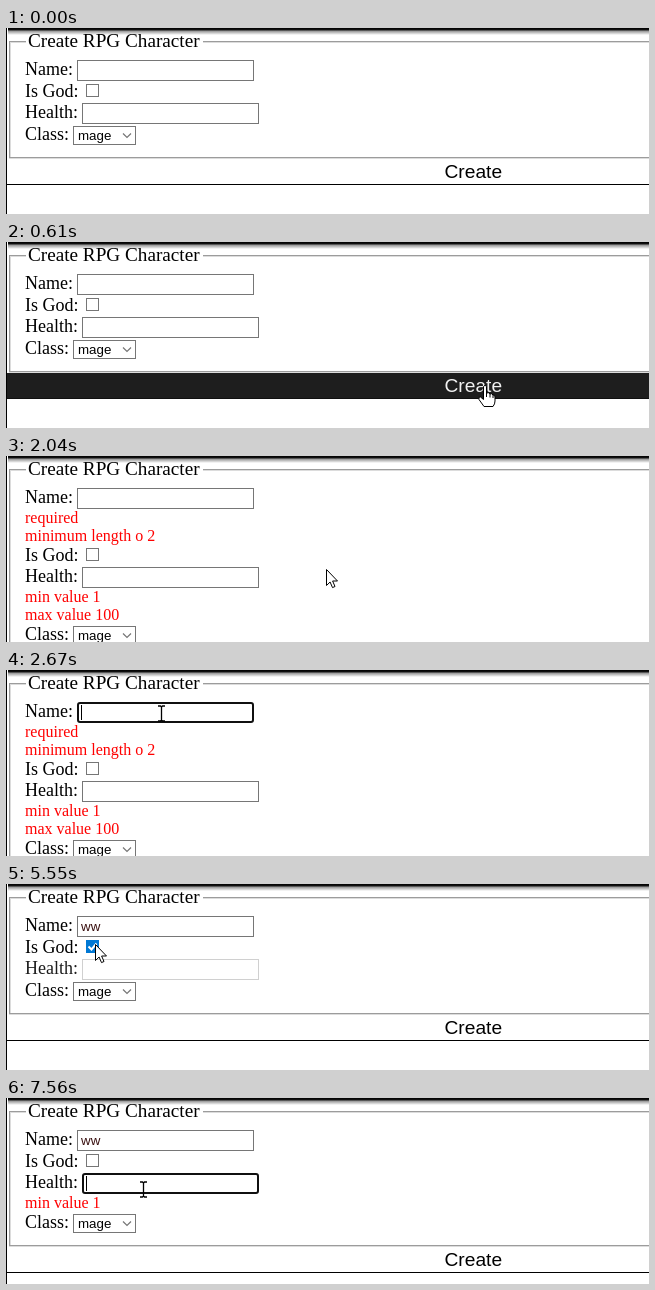
These frames come from a looping animation (643x186 px, 8 s). An HTML page with a canvas:

```html
<!DOCTYPE html>
<html lang="en">
<head>
<meta charset="utf-8">
<title>Create RPG Character</title>
<style>
html, body { margin: 0; width: 100%; height: 100%; overflow: hidden; background: #fff; }
canvas { display: block; }
</style>
</head>
<body>
<canvas id="stage" width="643" height="186"></canvas>
<script>
const W = 643, H = 186, LOOP = 8000, LINE = 18;
const ctx = document.getElementById('stage').getContext('2d', { alpha: false });
const SERIF = '"Liberation Serif", "Times New Roman", serif';
const SANS = '"Liberation Sans", Arial, sans-serif';
const BORDER = '#767676';

// Pointer path: time, x, y
const path = [
  [260, 560, 190], [400, 514, 157], [610, 479, 143], [780, 415, 137], [960, 383, 136],
  [1790, 383, 136], [2050, 318, 112], [2350, 190, 56], [2550, 155, 43],
  [4690, 155, 43], [4800, 89, 60],
  [6700, 89, 60], [7120, 128, 113],
  [7230, 128, 113], [7450, 137, 91]
];
const presses = [[1360, 1630], [2590, 2670], [5340, 5480], [6450, 6520], [7490, 7560]];

const shapes = {
  arrow: new Path2D('M.5 .5V16.5L4.1 13 6.5 18.6 9 17.5 6.6 12H11.5Z'),
  hand: new Path2D('M-1.5 1.5Q0-1 1.5 1.5V8q2.5-1 3.5 1q2-1 3 1q2-.5 2 2V16q0 3-2 5.5H-1L-6 14.5Q-7 11.5-4.5 12L-1.5 14.5Z'),
  text: new Path2D('M-3.5-7.5h2.5l1 1 1-1h2.5M0-6.5v13M-3.5 7.5h2.5l1-1 1 1h2.5')
};

const within = (t, from, to) => t >= from && t < to;
const clamp = v => Math.max(0, Math.min(1, v));
const ease = p => 1 - Math.pow(1 - clamp(p), 2.4);
const grey = v => `rgb(${[v, v, v].map(Math.round)})`;

function fill(x, y, w, h, color) {
  ctx.fillStyle = color;
  ctx.fillRect(x, y, w, h);
}

function frame(x, y, w, h, color) {
  ctx.strokeStyle = color;
  ctx.lineWidth = 1;
  ctx.strokeRect(x + .5, y + .5, w - 1, h - 1);
}

function write(text, x, y, size = 18, color = '#000', family = SERIF) {
  ctx.font = `${size}px ${family}`;
  ctx.fillStyle = color;
  ctx.fillText(text, x, y);
}

function pointerAt(t) {
  if (t < path[0][0]) return null;
  const i = path.findIndex(p => p[0] > t);
  if (i < 0) return path[path.length - 1].slice(1);
  const [t0, x0, y0] = path[i - 1], [t1, x1, y1] = path[i];
  const k = (t - t0) / (t1 - t0);
  return [x0 + (x1 - x0) * k, y0 + (y1 - y0) * k];
}

function input(x, y, { value = '', focused, caret, disabled }) {
  if (focused) {
    ctx.strokeStyle = '#101010';
    ctx.lineWidth = 2;
    ctx.beginPath();
    ctx.roundRect(x + 1, y + 1, 175, 19, 2);
    ctx.stroke();
  } else {
    frame(x, y, 177, 21, disabled ? '#d0d0d0' : BORDER);
  }
  write(value, x + 4, y + 15, 13.333, '#3a1010', SANS);
  if (caret) fill(x + 4 + Math.round(ctx.measureText(value).width), y + 3, 1, 15, '#000');
}

function errors(list, y) {
  list.forEach((text, i) => write(text, 19, y + 20 + i * LINE, 16, '#f00'));
}

function checkbox(x, y, checked, hover) {
  if (checked) {
    fill(x, y, 13, 13, '#0078d4');
    ctx.strokeStyle = '#fff';
    ctx.lineWidth = 2;
    ctx.stroke(new Path2D(`M${x + 2.5} ${y + 6.5}l3 3 5-6`));
  } else {
    frame(x, y, 13, 13, hover ? '#1a86d9' : BORDER);
  }
}

function fieldset(bottom) {
  const dark = '#9c9c9c', light = '#dcdcdc';
  fill(3, 13, W, 1, dark);
  fill(4, 14, W, 1, light);
  fill(3, 13, 1, bottom - 12, dark);
  fill(4, 14, 1, bottom - 14, light);
  fill(4, bottom, W, 1, dark);
  fill(3, bottom + 1, W, 1, light);
  fill(20, 12, 177, 4, '#fff');
  write('Create RPG Character', 22, 19, 19.2);
}

function pageEdges() {
  const shade = ctx.createLinearGradient(0, 0, 0, 7);
  shade.addColorStop(0, '#000');
  shade.addColorStop(.25, '#111');
  shade.addColorStop(.45, 'rgba(0,0,0,.4)');
  shade.addColorStop(1, 'rgba(0,0,0,0)');
  fill(2, 0, W, 7, shade);
  fill(0, 0, 1, H, '#000');
}

function drawPointer(t, [x, y], kind) {
  if (presses.some(([from, to]) => within(t, from, to))) {
    ctx.fillStyle = 'rgba(205,190,0,.75)';
    ctx.beginPath();
    ctx.arc(x - 1, y - 1, 12, 0, 7);
    ctx.fill();
  }
  ctx.save();
  ctx.translate(Math.round(x), Math.round(y));
  if (kind === 'text') ctx.translate(.5, .5);
  else {
    ctx.fillStyle = '#fff';
    ctx.fill(shapes[kind]);
  }
  ctx.strokeStyle = '#000';
  ctx.lineWidth = kind === 'text' ? 1.3 : 1;
  ctx.stroke(shapes[kind]);
  if (kind === 'hand') ctx.stroke(new Path2D('M1.5 8v4M5 9v3.5M8 10v3'));
  ctx.restore();
}

function draw(t) {
  const isGod = within(t, 5480, 6520);
  const nameErrors = within(t, 1630, 4330)
    ? ['required', 'minimum length o 2'].slice(t < 3870 ? 0 : 1) : [];
  const healthErrors = within(t, 1630, 5480) ? ['min value 1', 'max value 100']
    : t >= 6520 ? ['min value 1'] : [];
  const nameShift = nameErrors.length * LINE;
  const shift = nameShift + healthErrors.length * LINE;
  const pointer = pointerAt(t);
  const over = (x, y, w, h) => pointer &&
    within(pointer[0], x, x + w) && within(pointer[1], y, y + h);

  fill(0, 0, W, H, '#fff');
  fieldset(129 + shift);

  write('Name:', 19, 47);
  input(71, 32, {
    value: t < 3870 ? '' : t < 4330 ? 'w' : 'ww',
    focused: within(t, 2590, 5340),
    caret: within(t, 2590, 3140) || within(t, 3670, 4870)
  });
  errors(nameErrors, 47);

  write('Is God:', 19, 69 + nameShift);
  checkbox(80, 56 + nameShift, isGod, over(80, 56 + nameShift, 13, 13));

  const dim = t < 6520 ? ease((t - 5480) / 700) : 1 - ease((t - 6520) / 700);
  write('Health:', 19, 90 + nameShift, 18, grey(128 * dim));
  input(76, 75 + nameShift, { focused: t >= 7490, caret: t >= 7490, disabled: isGod });
  errors(healthErrors, 90 + nameShift);

  write('Class:', 19, 112 + shift);
  frame(67, 98 + shift, 63, 19, BORDER);
  write('mage', 72, 112 + shift, 13.333, '#000', SANS);
  ctx.strokeStyle = BORDER;
  ctx.lineWidth = 1.2;
  ctx.stroke(new Path2D(`M117 ${105.5 + shift}l4 4 4-4`));

  const hover = t < 1630 ? ease((t - 400) / 300) : 0;
  fill(1, 131 + shift, W, 25, grey(255 - 238 * hover));
  fill(1, 156 + shift, W, 1, grey(17 * hover));
  write('Create', 438.5, 150 + shift, 19.2, grey(255 * hover), SANS);

  pageEdges();
  if (pointer) {
    const onText = over(71, 32, 177, 21) || over(76, 75 + nameShift, 177, 21);
    const onButton = t < 1790 && over(0, 131, W, 26);
    drawPointer(t, pointer, onText ? 'text' : onButton ? 'hand' : 'arrow');
  }
}

function tick() {
  draw(performance.now() % LOOP);
  requestAnimationFrame(tick);
}
tick();
</script>
</body>
</html>
```
